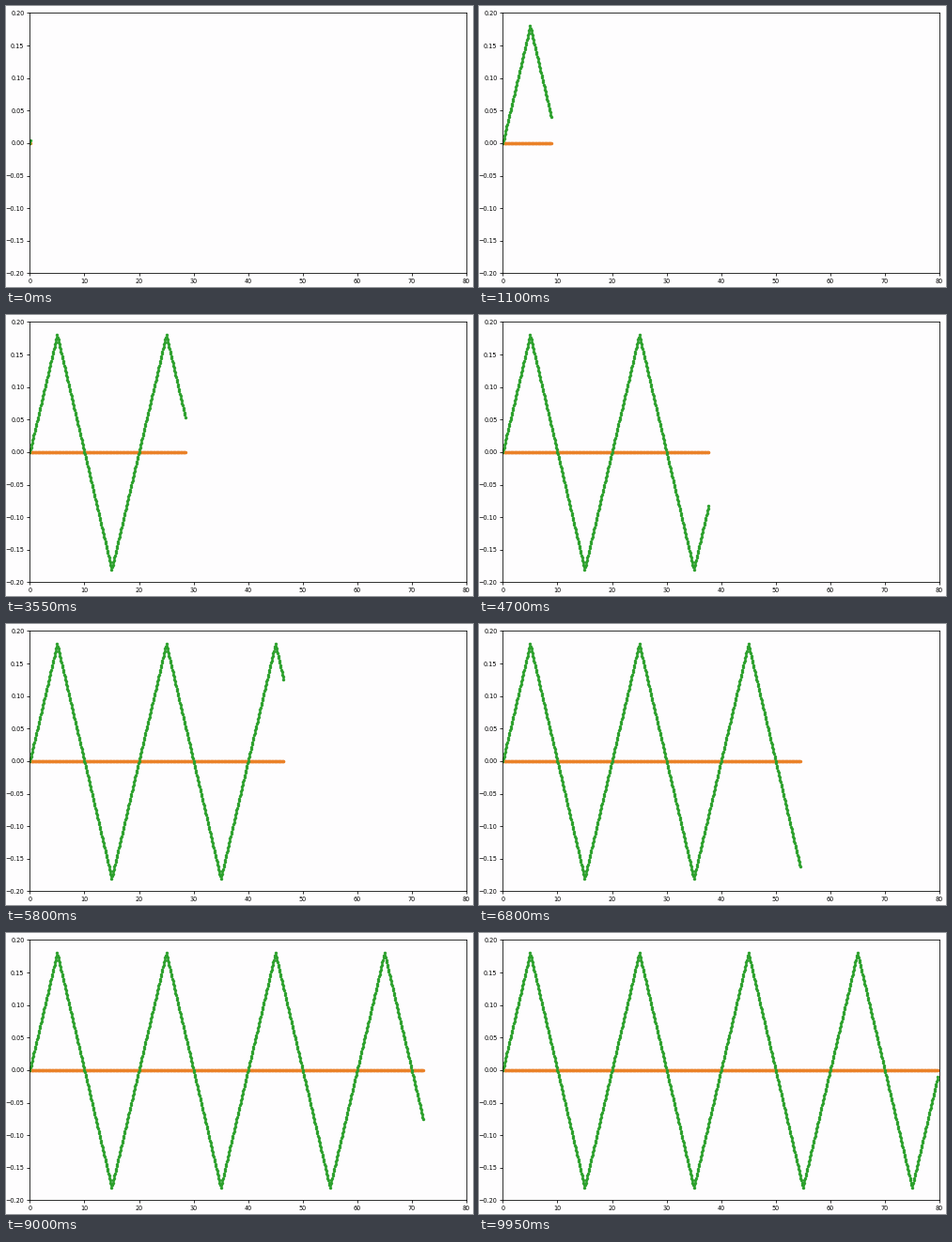
A matplotlib script for the animation above (10 s loop, 497 by 299 pixels).

```python
import numpy as np
import matplotlib.pyplot as plt
from matplotlib.animation import FuncAnimation

W, H, DPI = 497, 299, 72   # at 72 dpi one point is one pixel
FRAMES, INTERVAL = 200, 50
X_MAX, PERIOD, AMP = 80, 20, 0.18
SPACING, PER_FRAME = 0.1, 4   # dot distance and dots added per frame
PAPER = "#fefdfe"
ORANGE, GREEN = "#ea8128", "tab:green"


def triangle(x):
    """Triangle wave starting at zero and rising."""
    phase = (x / PERIOD + 0.25) % 1
    return AMP * (1 - 4 * np.abs(phase - 0.5))


fig = plt.figure(figsize=(W / DPI, H / DPI), dpi=DPI, facecolor=PAPER)
left, right, top, bottom = 25.4, 489.9, 7.4, 284.4
ax = fig.add_axes([left / W, 1 - bottom / H, (right - left) / W, (bottom - top) / H],
                  facecolor=PAPER)
ax.set_xlim(0, X_MAX)
ax.set_ylim(-0.2, 0.2)
ax.tick_params(labelsize=6.5, width=0.8, length=3, pad=3)

dots = dict(ls="none", marker="o", ms=3.4, mew=0)
flat, = ax.plot([], [], color=ORANGE, **dots)
wave, = ax.plot([], [], color=GREEN, **dots)


def draw(i):
    x = SPACING * np.arange(PER_FRAME * i + 2)
    flat.set_data(x, 0 * x)
    wave.set_data(x, triangle(x))
    return flat, wave


anim = FuncAnimation(fig, draw, frames=FRAMES, interval=INTERVAL,
                     init_func=lambda: draw(0), repeat=True, repeat_delay=0)
plt.show()
```
